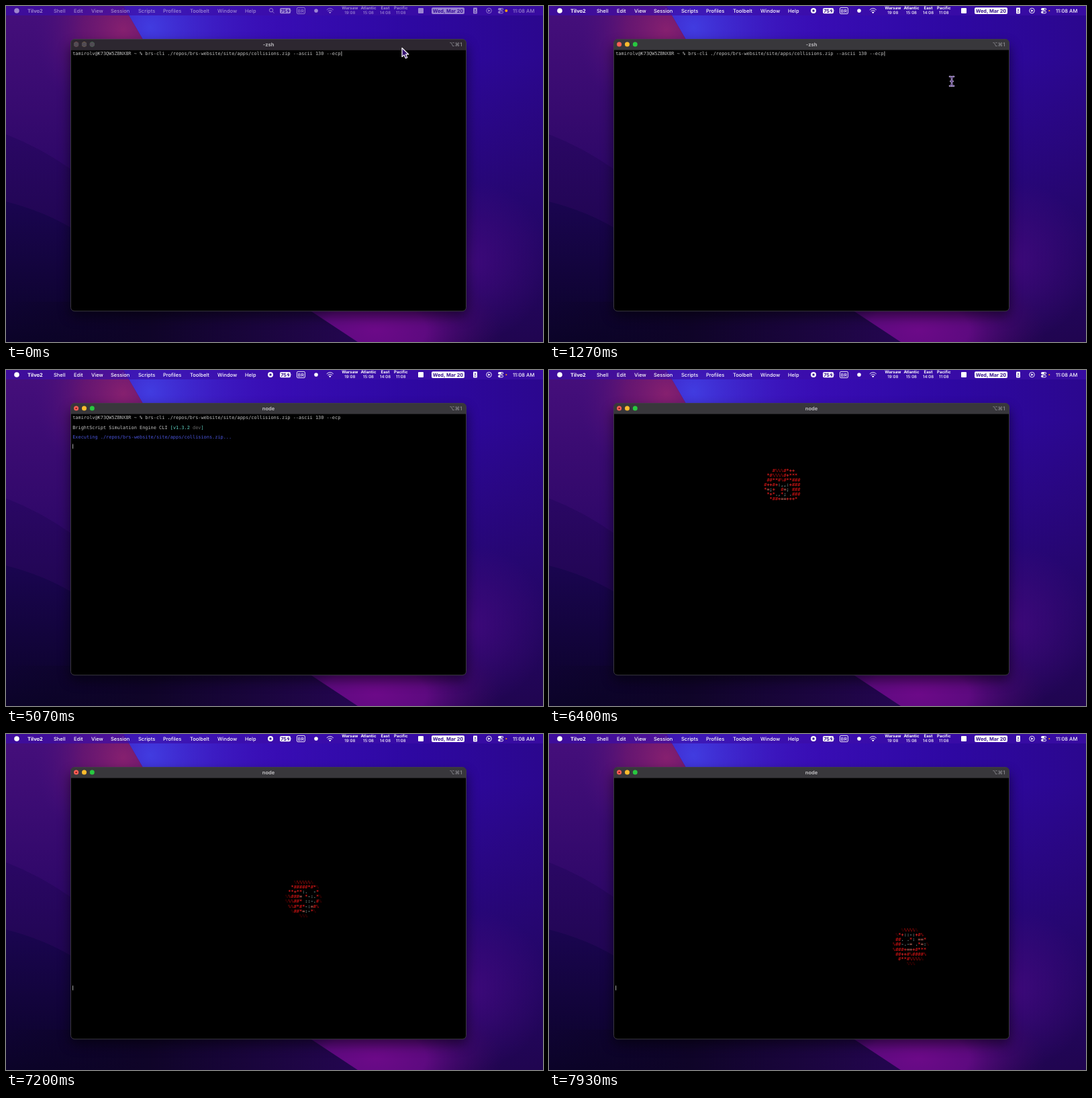
These frames come from a looping animation (800 px wide and 500 px high, 8000 ms). An HTML page:

```html
<!DOCTYPE html>
<html lang="en">
<head>
<meta charset="utf-8">
<title>Terminal bouncing ball</title>
<style>
html, body { margin: 0; width: 100%; height: 100%; overflow: hidden; background: #1b0650; }
svg { display: block; width: 800px; height: 500px; }
text { white-space: pre; text-rendering: geometricPrecision; }
.ui { font: 500 7.5px Inter, sans-serif; fill: #fff; }
.b { font-weight: 700; }
.mid { text-anchor: middle; }
.zone { font-size: 6.1px; text-anchor: middle; }
.term { font: 6.927px "DejaVu Sans Mono", monospace; fill: #c2c2c2; }
#ball { font-weight: 700; }
.icon { fill: none; stroke: #fff; stroke-width: .9; }

.menu, .idle, .shown, .search, .dot { animation: 8s linear infinite; }
.menu { animation-name: wake; }
.idle, .search { animation-name: leave; }
.shown { animation-name: arrive; }
.dot { animation-name: shrink; }
@keyframes wake { 0%, 1.625% { opacity: .5 } 8%, 100% { opacity: 1 } }
@keyframes leave { 0%, 1.625% { opacity: 1 } 8%, 100% { opacity: 0 } }
@keyframes arrive { 0%, 1.625% { opacity: 0 } 8%, 100% { opacity: 1 } }
@keyframes shrink { 0%, 1.625% { r: 2px } 8%, 100% { r: 1.1px } }

.step { animation: 8s step-end infinite; }
.zsh { animation-name: zsh; }
.node { animation-name: node; }
.command { animation-name: command; }
.version { animation-name: version; }
.exec { animation-name: exec; fill: #4a55dc; }
.run { animation-name: run; }
.caret { animation-name: caret; }
.arrow { animation-name: arrow; }
.beam { animation-name: beam; }
@keyframes zsh { 0% { opacity: 1 } 40%, 100% { opacity: 0 } }
@keyframes node { 0% { opacity: 0 } 40%, 100% { opacity: 1 } }
@keyframes command { 0% { opacity: 1 } 77.5%, 100% { opacity: 0 } }
@keyframes version { 0% { opacity: 0 } 33.375% { opacity: 1 } 77.5%, 100% { opacity: 0 } }
@keyframes exec { 0% { opacity: 0 } 35% { opacity: 1 } 77.5%, 100% { opacity: 0 } }
@keyframes run { 0% { opacity: 0 } 74.125% { opacity: 1 } 77.5%, 100% { opacity: 0 } }
@keyframes caret {
  0% { transform: translate(400.3px, 0); opacity: 1 }
  31.625% { transform: translate(0, 7.12px); opacity: 1 }
  33.375% { transform: translate(0, 28.48px); opacity: 1 }
  35% { transform: translate(0, 42.72px); opacity: 1 }
  74.125% { transform: translate(0, 64.08px); opacity: 1 }
  75% { transform: translate(0, 106.8px); opacity: 1 }
  77.5%, 100% { transform: translate(0, 106.8px); opacity: 0 }
}
@keyframes arrow { 0% { opacity: 1 } 4.8%, 100% { opacity: 0 } }
@keyframes beam { 0% { opacity: 0 } 4.8% { opacity: 1 } 24.125%, 100% { opacity: 0 } }
.pointer { animation: move 8s infinite; }
@keyframes move {
  0%, 1.625% { transform: translate(590px, 62px); animation-timing-function: ease-in-out }
  15.875%, 100% { transform: translate(600px, 112px) }
}
</style>
</head>
<body>
<svg viewBox="0 0 800 500" xmlns="http://www.w3.org/2000/svg">
  <defs>
    <linearGradient id="sky">
      <stop offset="0" stop-color="#3b0c7c"/><stop offset=".28" stop-color="#3c14bc"/>
      <stop offset=".5" stop-color="#380db4"/><stop offset=".75" stop-color="#2e08a2"/>
      <stop offset="1" stop-color="#2b078e"/>
    </linearGradient>
    <linearGradient id="dusk" x2="0" y2="1">
      <stop offset=".15" stop-color="#200550" stop-opacity="0"/>
      <stop offset="1" stop-color="#200550"/>
    </linearGradient>
    <linearGradient id="slope" x2="0" y2="1">
      <stop offset="0" stop-color="#460f7c"/><stop offset="1" stop-color="#2c0766"/>
    </linearGradient>
    <radialGradient id="plum" gradientUnits="userSpaceOnUse" cx="175" cy="35" r="135">
      <stop offset="0" stop-color="#86206f"/><stop offset=".45" stop-color="#6c176f" stop-opacity=".8"/>
      <stop offset="1" stop-color="#460f7c" stop-opacity="0"/>
    </radialGradient>
    <radialGradient id="blue" gradientUnits="userSpaceOnUse" cx="215" cy="32" r="190">
      <stop offset="0" stop-color="#413ce0"/><stop offset="1" stop-color="#3c14bc" stop-opacity="0"/>
    </radialGradient>
    <radialGradient id="violet" gradientUnits="userSpaceOnUse" cx="690" cy="380" r="120">
      <stop offset="0" stop-color="#460a82" stop-opacity=".75"/><stop offset="1" stop-color="#460a82" stop-opacity="0"/>
    </radialGradient>
    <radialGradient id="magenta" gradientUnits="userSpaceOnUse" cx="0" cy="0" r="1" gradientTransform="translate(550 482) scale(190 100)">
      <stop offset="0" stop-color="#6c0a88"/><stop offset=".4" stop-color="#5e0a80"/>
      <stop offset="1" stop-color="#3a0862" stop-opacity="0"/>
    </radialGradient>
    <linearGradient id="hill" x2="0" y2="1">
      <stop offset="0" stop-color="#2a0764"/><stop offset="1" stop-color="#16043e"/>
    </linearGradient>
    <linearGradient id="ridge" x2="0" y2="1">
      <stop offset="0" stop-color="#1a0550"/><stop offset="1" stop-color="#0b0328"/>
    </linearGradient>
    <linearGradient id="floor">
      <stop offset="0" stop-color="#0b0324" stop-opacity="0"/><stop offset=".4" stop-color="#0f0428"/>
      <stop offset="1" stop-color="#240650"/>
    </linearGradient>
    <filter id="soft" x="-20%" y="-20%" width="140%" height="140%"><feGaussianBlur stdDeviation="9"/></filter>
    <clipPath id="frame"><rect x="96.5" y="49.5" width="589" height="404.5" rx="5.5"/></clipPath>
    <path id="ibeam" d="M-3 -7Q0 -7 0 -5V5Q0 7 -3 7M3 -7Q0 -7 0 -5M0 5Q0 7 3 7M-1.6 0H1.6"/>
  </defs>

  <g id="wallpaper">
    <path fill="url(#sky)" d="M0 0H800V500H0z"/>
    <path fill="url(#dusk)" d="M0 0H800V500H0z"/>
    <path fill="url(#blue)" d="M170 0H440V230H170z"/>
    <path fill="url(#slope)" d="M0 0H175L204 50L110 260H0z"/>
    <path fill="url(#plum)" d="M0 0H175L204 50L110 260H0z"/>
    <path fill="url(#violet)" d="M540 200H800V500H540z"/>
    <path fill="url(#hill)" d="M0 191Q50 210 97 243L330 500H0z"/>
    <path fill="url(#ridge)" d="M0 291Q55 305 97 330Q190 390 300 500H0z"/>
    <path fill="url(#magenta)" d="M340 380H760V500H340z"/>
    <path fill="url(#floor)" d="M0 440H433L524 500H0z"/>
  </g>

  <path fill="#3d0ea8" opacity=".7" d="M0 0H800V14H0z"/>
  <g class="menu">
    <circle cx="16" cy="7" r="3.8" fill="#fff"/>
    <g id="labels" class="ui"></g>
    <g class="shown">
      <circle cx="394" cy="7" r="4" fill="#fff"/><rect x="392.5" y="5.5" width="3" height="3" rx=".5" fill="#34108f"/>
    </g>
    <g class="search icon"><circle cx="395" cy="6.2" r="2.7"/><path d="M397 8.3L399.3 10.6"/></g>
    <rect x="408" y="3" width="16" height="8.3" rx="2" fill="#fff"/><path d="M424.7 5.5q1.2 1.5 0 3z" fill="#fff"/>
    <text x="409.2" y="9.9" class="ui b" style="font-size:7.3px;fill:#34108f">75</text>
    <path d="M421 3.8L418.3 7.5H420.4L419.7 10.6L423 6.7H420.8z" fill="#34108f"/>
    <rect class="icon" x="433.4" y="2.4" width="12" height="9.2" rx="1.5"/>
    <text x="439.4" y="9.6" class="ui mid" style="font-size:7px">BR</text>
    <circle cx="462" cy="7" r="2.8" fill="#fff"/>
    <path class="icon" d="M477.7 5.8Q482.7 1.2 487.7 5.8M479.4 7.7Q482.7 4.8 486 7.7"/>
    <path d="M480.9 9.2Q482.7 7.7 484.5 9.2L482.7 11.2z" fill="#fff"/>
    <rect x="614" y="3" width="8" height="8" rx="1" fill="#fff"/>
    <rect x="634" y="2.2" width="49" height="9.8" rx="2" fill="#fff"/>
    <text x="658.5" y="9.7" class="ui b mid" style="font-size:7.3px;fill:#35128c">Wed, Mar 20</text>
    <rect x="696" y="2.5" width="6" height="9" rx="1" fill="#fff"/>
    <circle cx="699" cy="6" r="1" fill="#35128c"/><path d="M697.3 9h3.4" stroke="#35128c" stroke-width=".9"/>
    <circle class="icon" cx="719.5" cy="7" r="3.8"/><path d="M718.3 5.1L721.6 7L718.3 8.9z" fill="#fff"/>
    <rect x="733" y="3" width="8" height="3.5" rx="1.75" fill="#fff"/><circle cx="738.9" cy="4.75" r="1.1" fill="#35128c"/>
    <rect class="icon" x="733.4" y="7.8" width="7.2" height="3" rx="1.5"/><circle cx="735" cy="9.3" r="1.2" fill="#fff"/>
  </g>
  <circle class="dot" cx="745.3" cy="7" r="2" fill="#ff9f0a"/>

  <g id="window">
    <rect x="95" y="58" width="592" height="404" rx="8" fill="#000" opacity=".5" filter="url(#soft)"/>
    <g clip-path="url(#frame)">
      <path fill="#000" d="M96 49H686V455H96z"/>
      <path fill="#38373b" d="M96 49H686V65.6H96z"/>
      <path class="idle" fill="#2d2730" d="M96 49H686V65.6H96z"/>
    </g>
    <rect x="96.5" y="49.5" width="589" height="404.5" rx="5.5" fill="none" stroke="#423f48" stroke-width=".9"/>
    <circle cx="104.6" cy="57.1" r="3.5" fill="#ff5f57"/>
    <circle cx="116.5" cy="57.1" r="3.5" fill="#febc2e"/>
    <circle cx="128.3" cy="57.1" r="3.5" fill="#28c840"/>
    <circle class="step node" cx="104.6" cy="57.1" r="1.2" fill="#7d1210"/>
    <g class="idle" fill="#514b54">
      <circle cx="104.6" cy="57.1" r="3.7"/><circle cx="116.5" cy="57.1" r="3.7"/><circle cx="128.3" cy="57.1" r="3.7"/>
    </g>
    <g class="ui b mid" style="fill:#b9b8bb">
      <text class="step zsh" x="391" y="59.6">-zsh</text>
      <text class="step node" x="391" y="59.6">node</text>
    </g>
    <text x="679.5" y="59.6" text-anchor="end" fill="#85848a" style="font:600 7.8px Inter,'DejaVu Sans',sans-serif">⌥⌘1</text>
  </g>

  <g class="term">
    <text class="step command" x="99.2" y="73.4">tamirolv@K73QW5ZBNX8R ~ % brs-cli ./repos/brs-website/site/apps/collisions.zip --ascii 130 --ecp</text>
    <text class="step version" x="99.2" y="87.6">BrightScript Simulation Engine CLI <tspan fill="#62d6c6">[v1.3.2 <tspan fill="#6a6a6a">dev</tspan>]</tspan></text>
    <text class="step exec" x="99.2" y="101.9">Executing ./repos/brs-website/site/apps/collisions.zip...</text>
    <text class="step run" x="99.2" y="123.2">------ Running dev 'collisions.zip' main ------</text>
    <rect class="step caret" x="99.2" y="67.4" width=".9" height="7" fill="#bdbdbd"/>
    <g id="ball"></g>
  </g>

  <g class="pointer">
    <path class="step arrow" d="M0 .5V13.6L3.1 10.9L5.3 15.8L7.8 14.7L5.6 9.9H9.8z" fill="#36136f" stroke="#fff" stroke-width="1.2" stroke-linejoin="round"/>
    <g class="step beam" fill="none" stroke-linecap="round">
      <use href="#ibeam" stroke="#c3b2e2" stroke-width="2.6"/>
      <use href="#ibeam" stroke="#45256b" stroke-width=".9"/>
    </g>
  </g>
</svg>
<script>
const LOOP = 8000, FRAME = 200 / 3, BALL_START = 6195;
const CELL_W = 4.17, CELL_H = 7.12, LEFT = 99.2, BASE = 73.4;

const menu = [[32, "Tilvo2"], [71, "Shell"], [101, "Edit"], [127, "View"], [156, "Session"],
  [197, "Scripts"], [234, "Profiles"], [274, "Toolbelt"], [315, "Window"], [356, "Help"], [755, "11:08 AM"]];
const zones = [[512.3, "Warsaw", "19:08"], [540, "Atlantic", "15:08"], [565, "East", "14:08"], [588.3, "Pacific", "11:08"]];
document.getElementById("labels").innerHTML =
  menu.map(([x, s], i) => `<text x="${x}" y="9.6"${i ? "" : ' class="b"'}>${s}</text>`).join("") +
  zones.map(([x, name, time]) =>
    `<text class="zone b" x="${x}" y="5.4">${name}</text><text class="zone" x="${x}" y="12.2">${time}</text>`).join("");

// Three poses a quarter turn apart; "~" is a faint edge cell.
const poses = [
  ["   #%%%#*++  ", " *#%%%%#+*** ", " ##**#%#**###", "#++#+:,,:+###",
   "*=;+  #=; ###", " *+*.,*; .###", "  *##+==+++* ", ""],
  ["   ~%%%%%~   ", "  *#####*#*~ ", " **+**:.  -* ", "~%###= *-:.*~",
   "~%%##* ::-.#~", " %%#*#*-:=#% ", "  ~##*=:-*~  ", "     ~~~     "],
  ["   ~%%%%~    ", " ~*+::-:+#%  ", " ##. .*: ==* ", "%##-.-= .*=:~",
   "%###+==+#*** ", " ##++#%####% ", "  #**#%%%%~  ", "     ~~~     "]
];
const ink = { "~": "#3c0000", "%": "#800808", "#": "#b01010", "*": "#d61a1a", "+": "#e22626", "=": "#c0685c" };

// Samples a pose turned by an angle about the ball's centre.
function cell(pose, col, row, angle) {
  const x = (col - 6) * CELL_W, y = (row - 3) * CELL_H;
  const c = Math.cos(angle), s = Math.sin(angle);
  const px = Math.round((x * c + y * s) / CELL_W + 6);
  const py = Math.round((y * c - x * s) / CELL_H + 3);
  return (pose[py] || "")[px] || " ";
}

function drawBall(step) {
  const turn = step < 15 ? (step - 3) / 12 : 1 + (step - 15) / 11;
  const k = Math.max(0, Math.min(2, Math.round(turn)));
  const angle = (k - turn) * Math.PI / 2;
  const col = Math.floor(53 + 23 * turn + 1e-6), row = Math.floor(11 + 10 * turn + 1e-6);
  let out = "";
  for (let j = 0; j < 8; j++) {
    let line = "";
    for (let i = 0; i < 13; i++) {
      const ch = cell(poses[k], i, j, angle);
      line += `<tspan fill="${ink[ch] || "#728a88"}">${ch === "~" ? "%" : ch}</tspan>`;
    }
    out += `<text x="${LEFT + col * CELL_W}" y="${BASE + (row + j) * CELL_H}">${line}</text>`;
  }
  if (step % 11 > 3) out += `<rect x="${LEFT}" y="374.4" width=".9" height="7" fill="#bdbdbd"/>`;
  return out;
}

const ball = document.getElementById("ball");
let start = null, last = null;
function tick(now) {
  if (start === null) start = now;
  const t = (now - start) % LOOP;
  const step = Math.floor((t - BALL_START) / FRAME);
  if (step !== last) {
    ball.innerHTML = step < 0 ? "" : drawBall(step);
    last = step;
  }
  requestAnimationFrame(tick);
}
requestAnimationFrame(tick);
</script>
</body>
</html>
```
